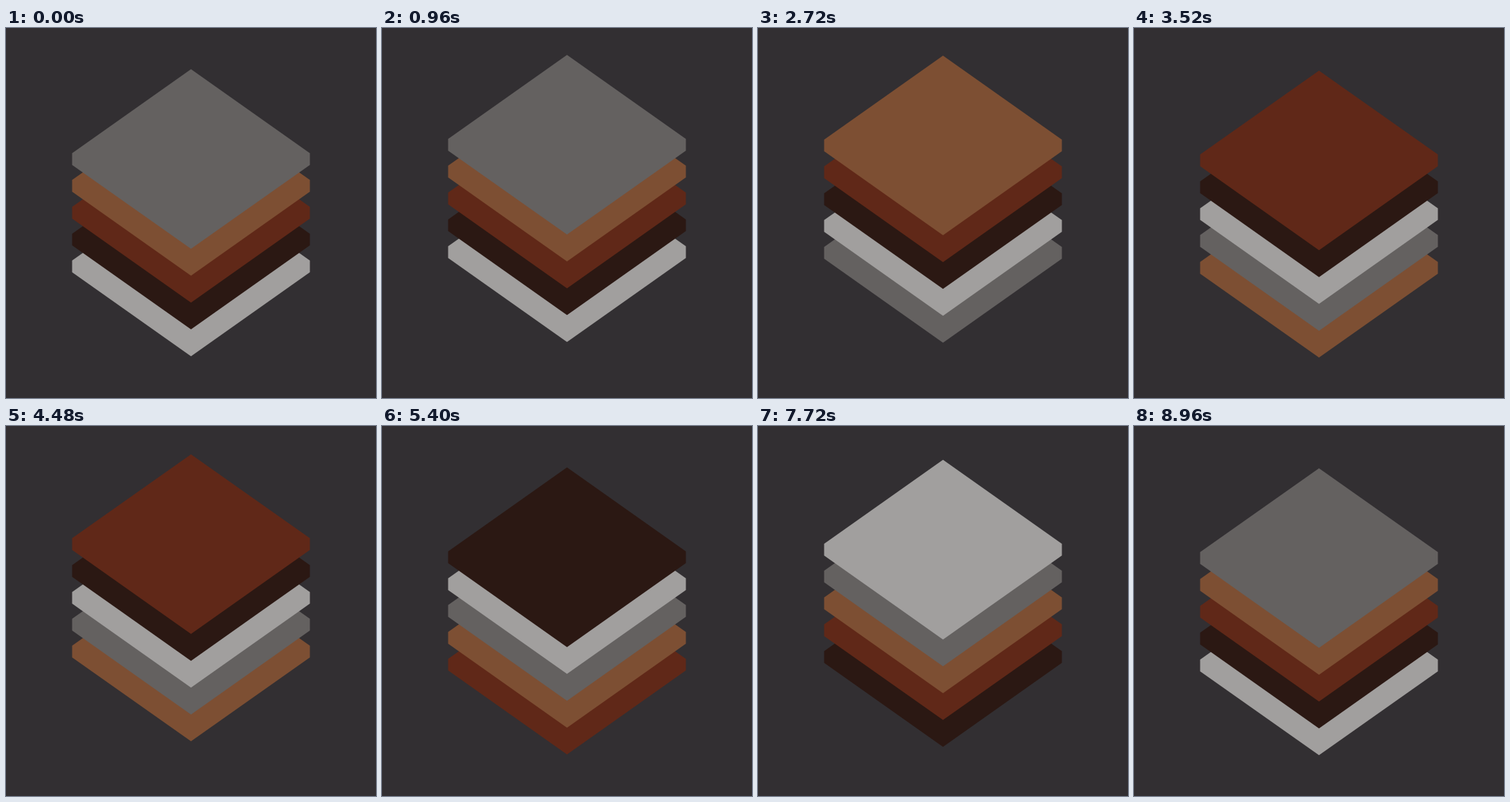
Recreate the animation shown at these times as an HTML page. Size 512 by 512 pixels, loop 9 s.

```html
<!DOCTYPE html>
<html lang="en">
<head>
<meta charset="utf-8">
<title>Rising layers</title>
<style>
  html, body { margin: 0; width: 100%; height: 100%; overflow: hidden; background: #322f32; }
  svg { display: block; width: 100vw; height: 100vh; }
</style>
</head>
<body>
<svg viewBox="0 0 512 512">
  <defs>
    <path id="tile" d="M256 0 L420.5 116.2 V132.4 L256 248.6 L91.5 132.4 V116.2 Z"/>
  </defs>
  <g id="stack"></g>
</svg>
<script>
  const LOOP = 9000;
  const STEP = 1806;   // time to climb one gap
  const LEAD = 116;    // progress of the first climb when the loop starts
  const GAP = 37.15;
  const TOP = 59.39;   // tip of the top tile right after a swap
  const COLORS = ["#646160", "#7d4f33", "#602818", "#2b1813", "#a19f9e"];

  const stack = document.getElementById("stack");
  const count = COLORS.length;

  // Lowest tile first, so that higher ones cover it.
  const tiles = COLORS.map((_, i) => {
    const slot = count - 1 - i;
    const use = document.createElementNS("http://www.w3.org/2000/svg", "use");
    use.setAttribute("href", "#tile");
    use.setAttribute("y", slot * GAP);
    stack.appendChild(use);
    return { use, slot };
  });

  function draw(time) {
    const climb = (time % LOOP + LEAD) / STEP;
    const swaps = Math.floor(climb);
    const y = TOP - (climb - swaps) * GAP;
    stack.setAttribute("transform", `translate(0 ${y.toFixed(3)})`);
    for (const { use, slot } of tiles) {
      use.setAttribute("fill", COLORS[(slot + swaps) % count]);
    }
  }

  const start = performance.now();
  function tick() {
    draw(performance.now() - start);
    requestAnimationFrame(tick);
  }
  tick();
</script>
</body>
</html>
```
